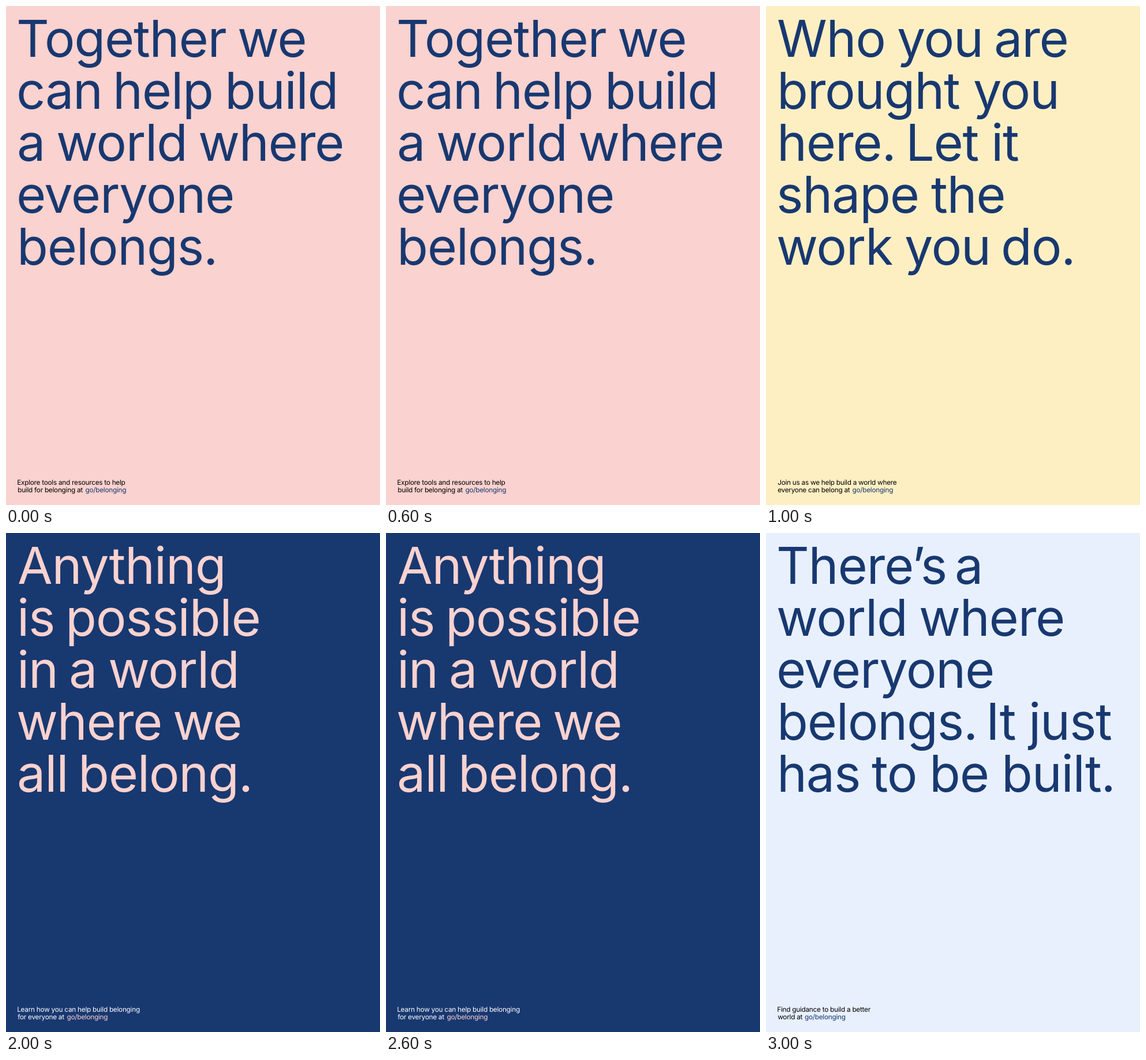
An HTML page that plays this animation: 648 px wide and 864 px high, repeating every 4000 ms.

```html
<!DOCTYPE html>
<html lang="en">
<head>
<meta charset="utf-8">
<title>Belonging posters</title>
<style>
  html, body { margin: 0; width: 100%; height: 100%; overflow: hidden; }
  svg { display: block; width: 100vw; height: 100vh; }
  text {
    font-family: Inter, "Open Sans", sans-serif;
    font-optical-sizing: none;
    text-rendering: geometricPrecision;
  }
  .head { letter-spacing: -0.014em; }
  .foot { letter-spacing: -0.022em; }
</style>
</head>
<body>
<svg id="stage" viewBox="0 0 648 864" xmlns="http://www.w3.org/2000/svg"></svg>
<script>
const HOLD = 1000;
const SIZES = { head: 88, foot: 11.8 };
const NAVY = "#183870", PINK = "#fad2cf";

// Each headline line alternates the left edge of a word and the word itself.
const posters = [
  {
    bg: PINK, ink: NAVY, note: "#000",
    lines: ["22 Together 404 we", "22 can 191 help 385 build", "22 a 90 world 336 where",
            "22 everyone", "25 belongs."],
    foot: ["Explore tools and resources to help", "build for belonging at"], linkX: 137.5
  },
  {
    bg: "#feefc3", ink: NAVY, note: "#000",
    lines: ["21 Who 229 you 398 are", "25 brought 361 you", "25 here. 249 Let 395 it",
            "22 shape 286 the", "21 work 242 you 411 do."],
    foot: ["Join us as we help build a world where", "everyone can belong at"], linkX: 149.5
  },
  {
    bg: NAVY, ink: PINK, note: "#fff",
    lines: ["22 Anything", "24 is 109 possible", "24 in 112 a 180 world",
            "21 where 292 we", "22 all 131 belong."],
    foot: ["Learn how you can help build belonging", "for everyone at"], linkX: 105.5
  },
  {
    bg: "#e8f0fe", ink: NAVY, note: "#000",
    lines: ["22 There’s 330 a", "21 world 268 where", "22 everyone",
            "25 belongs. 388 It 453 just", "25 has 183 to 289 be 414 built."],
    foot: ["Find guidance to build a better", "world at"], linkX: 67
  }
];

const stage = document.getElementById("stage");
const pen = document.createElement("canvas").getContext("2d");

function add(parent, tag, attrs, content = "") {
  const el = document.createElementNS("http://www.w3.org/2000/svg", tag);
  for (const key in attrs) el.setAttribute(key, attrs[key]);
  el.textContent = content;
  return parent.appendChild(el);
}

// Places text so that its visible left edge, not its origin, sits at x.
function write(parent, str, x, y, kind, fill) {
  const size = SIZES[kind];
  pen.font = `${size}px Inter, "Open Sans", sans-serif`;
  const bearing = -pen.measureText(str[0]).actualBoundingBoxLeft;
  add(parent, "text", { class: kind, x: x - bearing, y, "font-size": size, fill }, str);
}

const scenes = posters.map(p => {
  const g = add(stage, "g", {});
  add(g, "rect", { width: 648, height: 864, fill: p.bg });
  p.lines.forEach((line, row) => {
    const parts = line.split(" ");
    for (let i = 0; i < parts.length; i += 2)
      write(g, parts[i + 1], +parts[i], 88.2 + row * 90, "head", p.ink);
  });
  p.foot.forEach((str, row) => write(g, str, 20.2, 829 + row * 13, "foot", p.note));
  write(g, "go/belonging", p.linkX, 842, "foot", p.ink);
  return g;
});

function show(time) {
  const current = Math.floor(time / HOLD) % scenes.length;
  scenes.forEach((g, i) => g.setAttribute("display", i === current ? "inline" : "none"));
}

const start = performance.now();
function tick() {
  show(performance.now() - start);
  requestAnimationFrame(tick);
}
tick();
</script>
</body>
</html>
```
